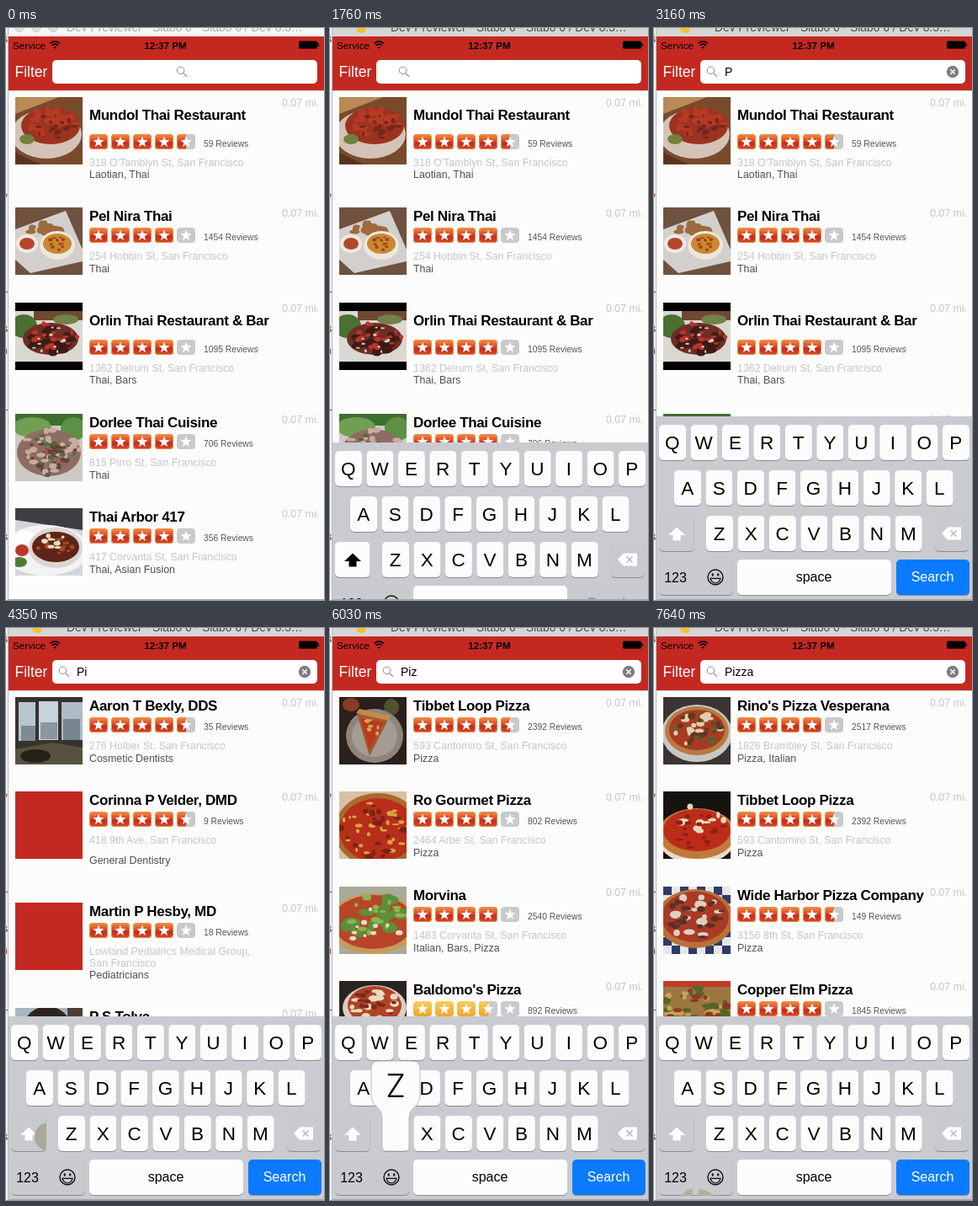
These frames come from a looping animation (378 by 679 pixels, 8 s). An HTML page:

```html
<!DOCTYPE html>
<html lang="en">
<head>
<meta charset="utf-8">
<title>Restaurant search</title>
<style>
html, body { margin: 0; width: 100%; height: 100%; overflow: hidden; background: #fcfcfc; }
svg { display: block; width: 378px; height: 679px; font-family: "Liberation Sans", Arial, sans-serif; }
.t { animation: 8s step-end infinite; }
.name { font-weight: bold; font-size: 17px; letter-spacing: -.35px; }
.count { font-size: 10.3px; fill: #555; }
.soft { font-size: 12.4px; fill: #c6c6c8; }
.cat { font-size: 12.4px; fill: #505050; }
.key { font-size: 22.5px; text-anchor: middle; }
.label { font-size: 16px; text-anchor: middle; }
.big { font: 300 38px Inter, Roboto, sans-serif; text-anchor: middle; }
</style>
</head>
<body>
<svg id="stage" viewBox="0 0 378 679"></svg>
<script>
const LOOP = 8000, RED = '#c42921';
const rules = [];

// Stepped keyframes from [ms, value] stops
function track(prop, stops) {
  const name = 'k' + rules.length;
  rules.push(`@keyframes ${name}{${stops.map(([ms, v]) => `${ms / LOOP * 100}%{${prop}:${v}}`).join('')}}`);
  return `class="t" style="animation-name:${name}"`;
}
function show(from, to, body) {
  const stops = [[0, from ? 0 : 1]];
  if (from) stops.push([from, 1]);
  if (to < LOOP) stops.push([to, 0]);
  return `<g ${track('opacity', stops)}>${body}</g>`;
}

const rect = (x, y, w, h, fill, r = 0) => `<rect x="${x}" y="${y}" width="${w}" height="${h}" rx="${r}" fill="${fill}"/>`;
const oval = (x, y, rx, ry, fill) => `<ellipse cx="${x}" cy="${y}" rx="${rx}" ry="${ry}" fill="${fill}"/>`;
const poly = (points, fill) => `<polygon points="${points}" fill="${fill}"/>`;
const line = (d, color, w = 1) => `<path d="${d}" fill="none" stroke="${color}" stroke-width="${w}"/>`;
const text = (x, y, s, cls = '', fill = '') =>
  `<text x="${x}" y="${y}" class="${cls}"${fill && ` style="fill:${fill}"`}>${s.replace(/&/g, '&amp;')}</text>`;

// Seeded blobs of food inside an ellipse
function bits(seed, n, color, x, y, rx, ry, size = 3) {
  const rnd = () => (seed = (seed * 16807) % 2147483647) / 2147483647;
  let out = '';
  for (let i = 0; i < n; i++) {
    const a = rnd() * 6.283, d = Math.sqrt(rnd());
    out += oval((x + Math.cos(a) * d * rx).toFixed(1), (y + Math.sin(a) * d * ry).toFixed(1),
      (size * (.5 + rnd())).toFixed(1), (size * (.4 + rnd() * .6)).toFixed(1), color);
  }
  return out;
}

const photos = {
  wings: rect(0, 0, 80, 80, '#7a4a2d') + poly('0,0 52,0 0,20', '#b98a55') + poly('0,66 30,80 0,80', '#5a3320') + oval(37, 44, 42, 29, '#d3c3b6') +
    oval(42, 34, 35, 22, '#9c3320') + bits(7, 24, '#b83a24', 42, 32, 31, 18, 5) + bits(19, 16, '#74261a', 42, 36, 30, 17, 3) + oval(14, 50, 9, 6, '#71803c'),
  platter: rect(0, 0, 80, 80, '#6f5140') + poly('0,26 60,4 80,50 80,64 18,78 0,62', '#d3cfcc') + bits(3, 18, '#9c6a3d', 36, 27, 22, 9, 5) +
    oval(14, 43, 13, 11, '#eee9e3') + oval(14, 43, 9, 7, '#b4472a') + oval(50, 45, 21, 17, '#ece6dd') + oval(50, 43, 17, 12, '#c9892f') + bits(9, 12, '#a8401f', 50, 43, 13, 8, 2),
  beef: rect(0, 0, 80, 80, '#000') + rect(0, 10, 80, 60, '#dad8d2') + oval(10, 28, 16, 14, '#4c6f32') + rect(22, 10, 58, 11, '#6f4a31') + oval(60, 20, 15, 6, '#718148') +
    oval(42, 43, 33, 19, '#6f2d24') + bits(5, 24, '#3d1c18', 42, 43, 31, 17, 5) + bits(15, 16, '#bd3427', 44, 41, 30, 18, 3) + bits(25, 12, '#d8cabc', 40, 46, 30, 18, 2),
  larb: rect(0, 0, 80, 80, '#cdc9c5') + rect(0, 0, 80, 14, '#3f6f30') + oval(20, 16, 23, 12, '#6f9f52') + oval(69, 18, 15, 14, '#5d8f45') + oval(40, 46, 38, 28, '#8d6c62') +
    bits(8, 28, '#5f433d', 42, 46, 34, 25, 4) + bits(18, 26, '#c9aaa0', 42, 44, 34, 26, 4) + bits(28, 12, '#47702f', 42, 47, 34, 26, 3) + bits(31, 6, '#b53a32', 34, 50, 24, 18, 2),
  curry: rect(0, 0, 80, 80, '#d4d5dc') + poly('0,0 80,0 80,26 0,14', '#3f3d42') + oval(36, 50, 52, 30, '#f3f3f5') + oval(12, 38, 13, 11, '#fff') +
    oval(8, 50, 8, 7, '#b8382a') + oval(5, 64, 9, 6, '#4f7c33') + oval(48, 47, 32, 24, '#dcd5d2') + oval(48, 46, 28, 18, '#5f2418') + bits(6, 12, '#a8481f', 48, 46, 22, 13, 3) + bits(16, 10, '#ead9bd', 46, 40, 16, 8, 3),
  office: rect(0, 0, 80, 80, '#37322c') + rect(4, 6, 20, 46, '#b9c6d0') + rect(28, 5, 23, 46, '#c7d2da') + rect(55, 6, 25, 45, '#aebcc8') +
    rect(7, 34, 17, 18, '#7f8b93') + rect(30, 30, 20, 20, '#8a979f') + rect(57, 26, 20, 25, '#76858f') + poly('0,62 44,54 80,60 80,80 0,80', '#57513f') + oval(24, 70, 18, 8, '#252119'),
  plain: rect(0, 0, 80, 80, RED),
  portrait: rect(0, 0, 80, 80, '#a7b6c4') + oval(38, 24, 28, 26, '#2d2422') + rect(62, 0, 18, 80, '#4b4038'),
  slice: rect(0, 0, 80, 80, '#2b201b') + oval(14, 9, 10, 8, '#8b3b24') + oval(62, 12, 9, 10, '#54502f') + oval(42, 46, 34, 32, '#8b857e') + oval(42, 46, 27, 25, '#a39c93') +
    poly('21,20 58,27 36,70', '#a25a2c') + poly('25,25 53,30 36,62', '#b8391f') + poly('20,19 24,14 61,22 58,28', '#c58a4d') + bits(4, 8, '#d9a352', 38, 36, 11, 10, 3),
  deep: rect(0, 0, 80, 80, '#d7c2a2') + oval(46, 46, 52, 44, '#a86a2e') + oval(46, 46, 46, 38, '#b72e1b') + bits(11, 32, '#d7a43e', 44, 44, 42, 34, 3) + bits(21, 22, '#7f2115', 44, 46, 42, 34, 4),
  greens: rect(0, 0, 80, 80, '#a9ab98') + oval(40, 44, 54, 36, '#c79a5c') + oval(40, 42, 48, 32, '#b84429') + bits(12, 28, '#5d8f36', 42, 34, 40, 24, 7) + bits(22, 18, '#8db354', 42, 34, 38, 24, 4) + bits(32, 10, '#e4dcc4', 40, 46, 38, 20, 3),
  baked: rect(0, 0, 80, 80, '#2a2421') + oval(42, 32, 38, 27, '#d8cfc5') + oval(42, 29, 32, 23, '#b04326') + bits(13, 18, '#ead8c2', 42, 27, 28, 20, 4) + bits(23, 14, '#7a2a1b', 42, 27, 28, 20, 3),
  coppa: rect(0, 0, 80, 80, '#3a3532') + oval(40, 43, 42, 34, '#c9c7c3') + oval(40, 40, 38, 29, '#b67b43') + oval(40, 39, 33, 24, '#a83a22') +
    bits(14, 16, '#e0cfae', 40, 38, 30, 21, 4) + bits(24, 14, '#5b3a22', 40, 38, 30, 21, 4) + bits(34, 10, '#52682f', 40, 38, 30, 21, 3),
  round: rect(0, 0, 80, 80, '#15120f') + oval(40, 56, 46, 30, '#e5dccd') + oval(40, 50, 46, 30, '#c07a3b') + oval(40, 46, 40, 25, '#bd2c19') + bits(15, 10, '#e9d5b8', 42, 34, 30, 18, 4) + bits(25, 18, '#8f1f12', 40, 48, 36, 21, 3),
  checks: rect(0, 0, 80, 80, '#e6e6ea') + Array.from({ length: 32 }, (_, i) =>
    rect(i % 4 * 20 + (i >> 2) % 2 * 10, (i >> 2) * 10, 10, 10, '#303b66')).join('') + oval(38, 38, 46, 35, '#b9713a') +
    oval(38, 36, 40, 30, '#a93a24') + bits(16, 18, '#dcd0c2', 38, 36, 34, 25, 5) + bits(26, 20, '#5a3026', 38, 38, 36, 26, 4),
  square: rect(0, 0, 80, 80, '#9c7640') + rect(0, 0, 80, 7, '#c23a2e') + bits(17, 26, '#55652c', 40, 30, 40, 24, 5) + bits(27, 20, '#c9a15a', 40, 30, 40, 24, 4) + bits(37, 12, '#8c3a22', 40, 30, 38, 22, 4)
};

const starPath = Array.from({ length: 10 }, (_, i) => {
  const r = i % 2 ? 2.9 : 6.8, a = i * Math.PI / 5;
  return `${(11 + r * Math.sin(a)).toFixed(2)},${(9.4 - r * Math.cos(a)).toFixed(2)}`;
}).join(' ');

const defs = `<defs>
  <linearGradient id="hot" x2="0" y2="1"><stop offset="0" stop-color="#f39043"/><stop offset=".35" stop-color="#e2582c"/><stop offset=".6" stop-color="#c62c1d"/><stop offset="1" stop-color="#d8492a"/></linearGradient>
  <linearGradient id="warm" x2="0" y2="1"><stop offset="0" stop-color="#f8cf5c"/><stop offset="1" stop-color="#f0a42c"/></linearGradient>
  <clipPath id="half"><path d="M0 0H11V18H0Z"/></clipPath>
  <clipPath id="pic"><path d="M0 0H80V80H0Z"/></clipPath>
  <clipPath id="phone"><path d="M3 10H378V678H3Z"/></clipPath></defs>`;

const badge = fill => rect(0, 0, 22, 18, fill, 4) +
  (fill === 'url(#hot)' ? '<rect x=".5" y=".5" width="21" height="17" rx="3.5" fill="none" stroke="#ee8a45"/>' : '');

function rating(y, score) {
  const fill = score < 4 ? 'url(#warm)' : 'url(#hot)';
  return [0, 1, 2, 3, 4].map(i => {
    const part = score - i;
    const back = part >= 1 ? badge(fill)
      : badge('#c9cacc') + (part > 0 ? `<g clip-path="url(#half)">${badge(fill)}</g>` : '');
    return `<g transform="translate(${99 + 26 * i} ${y})">${back}${poly(starPath, '#fff')}</g>`;
  }).join('');
}

// drop: extra space over the title; gap: extra space over the category
function row([y, photo, name, score, count, street, cat, drop = 0, gap = 0]) {
  const top = y + (drop ? 11 : 0), mid = y + (drop ? 20 : 0);
  return `<g transform="translate(11 ${y})" clip-path="url(#pic)">${photos[photo]}</g>` +
    text(99, top + 16, name, 'name') + rating(mid + 24, score) + text(235, mid + 38.5, count + ' Reviews', 'count') +
    street.split('|').map((s, i) => text(99, mid + 61.5 + 14 * i, s, 'soft')).join('') +
    text(99, mid + 77 + gap - (drop ? 1 : 0), cat, 'cat') + text(328, y + 11, '0.07 mi.', 'soft');
}
const list = (from, to, rows) => show(from, to, rect(3, 74, 375, 604, '#fcfcfc') + rows.map(row).join(''));
const CITY = ', San Francisco';

const lists =
  list(0, 3720, [
    [82, 'wings', 'Mundol Thai Restaurant', 4.5, 59, "318 O'Tamblyn St" + CITY, 'Laotian, Thai', 1],
    [213, 'platter', 'Pel Nira Thai', 4, 1454, '254 Hobbin St' + CITY, 'Thai'],
    [326, 'beef', 'Orlin Thai Restaurant & Bar', 4, 1095, '1362 Delrum St' + CITY, 'Thai, Bars', 1],
    [458, 'larb', 'Dorlee Thai Cuisine', 4, 706, '815 Pirro St' + CITY, 'Thai'],
    [570, 'curry', 'Thai Arbor 417', 4, 356, '417 Corvanta St' + CITY, 'Thai, Asian Fusion']]) +
  list(3720, 5400, [
    [82, 'office', 'Aaron T Bexly, DDS', 4.5, 35, '276 Holber St' + CITY, 'Cosmetic Dentists'],
    [194, 'plain', 'Corinna P Velder, DMD', 4.5, 9, '418 9th Ave' + CITY, 'General Dentistry', 0, 9],
    [326, 'plain', 'Martin P Hesby, MD', 4, 18, 'Lowland Pediatrics Medical Group,|San Francisco', 'Pediatricians', 0, 13],
    [451, 'portrait', 'P S Tolva', 4, 12, '590 Marrin St' + CITY, 'Doctors']]) +
  list(5400, 7640, [
    [82, 'slice', 'Tibbet Loop Pizza', 4.5, 2392, '593 Cantomiro St' + CITY, 'Pizza'],
    [194, 'deep', 'Ro Gourmet Pizza', 4, 802, '2464 Arbe St' + CITY, 'Pizza'],
    [307, 'greens', 'Morvina', 4, 2540, '1483 Corvanta St' + CITY, 'Italian, Bars, Pizza'],
    [419, 'baked', "Baldomo's Pizza", 3.5, 892, '350 Tellis St' + CITY, 'Pizza']]) +
  list(7640, LOOP, [
    [82, 'coppa', "Rino's Pizza Vesperana", 4, 2517, '1826 Brambley St' + CITY, 'Pizza, Italian'],
    [194, 'round', 'Tibbet Loop Pizza', 4.5, 2392, '593 Cantomiro St' + CITY, 'Pizza'],
    [307, 'checks', 'Wide Harbor Pizza Company', 4.5, 149, '3156 8th St' + CITY, 'Pizza'],
    [419, 'square', 'Copper Elm Pizza', 4, 1845, '702 Osker St' + CITY, 'Pizza']]);

// Window title and the sliver of desktop on the left
const title = fill => `<text x="72" y="4" font-size="13.8" fill="${fill}">Dev Previewer - Slabo 6 - Slabo 6 / Dev 8.3…</text>`;
const frame = rect(0, 0, 3, 679, '#f3f3f6') + rect(2, 0, 1, 679, '#b9b9be') +
  [[17, 's', '#333'], [205, '?', '#d22'], [322, 'T', '#334'], [361, 's', '#222'], [387, 'n', '#c33'], [451, '_', '#222'], [608, 's', '#222']]
    .map(([y, s, c]) => `<text x="2" y="${y}" font-size="12" text-anchor="end" fill="${c}">${s}</text>`).join('') +
  rect(3, 678, 375, 1, '#a6a6a9') +
  show(0, 500, rect(3, 0, 375, 10, '#f6f6f6') + [16, 36, 56].map(x =>
    `<circle cx="${x}" cy="-1" r="5.5" fill="#dedede" stroke="#c6c6c6"/>`).join('') + title('#a9a9a9')) +
  show(500, LOOP, rect(3, 0, 375, 10, '#d6d6d7') + oval(37, 0, 6, 6, '#f6be32') + title('#4a4a4a'));

const bar = rect(3, 10, 375, 64, RED) + rect(3, 74, 375, 1, '#d4d2d2') +
  '<text x="8" y="24.5" font-size="11.7">Service</text>' +
  line('M52.5 18.2Q58.2 13.6 64 18.2M54.6 20.6Q58.2 17.6 61.9 20.6', '#000', 1.7) + poly('56.2,22.4 60.2,22.4 58.2,24.8', '#000') +
  '<text x="189.5" y="24.5" font-size="11.7" font-weight="bold" text-anchor="middle">12:37 PM</text>' +
  rect(348, 15.5, 22, 9, '#000', 1.5) + rect(370.5, 18, 1.5, 4, '#000') +
  '<text x="10.5" y="58" font-size="17.5" fill="#fff">Filter</text>' + rect(55, 38, 315, 28, '#fff', 5);

// Motion is sampled at these moments
const beats = [1550, 1620, 1690, 1760, 1830, 1970, 2040, 2180];
const spring = ms => { const x = .0106 * (ms - 1437); return (1 + x) * Math.exp(-x); };
const ease = ms => { const p = Math.min(1, (ms - 1459) / 390); return p * p * (3 - 2 * p); };
const slide = (axis, first, at) => track('transform', [[0, first], ...beats.map(ms => [ms, at(ms)])].map(([ms, v]) => [ms, `translate${axis}(${v}px)`]));

const lens = `<g ${slide('X', 140, ms => Math.round(140 * (1 - ease(ms))))}><circle cx="67.5" cy="50.3" r="4.3" fill="none" stroke="#8b8b90"/>${line('M70.6 53.4L75 57.8', '#8b8b90', 1.2)}</g>`;

const typed = [[3090, 'P'], [4280, 'Pi'], [5680, 'Piz'], [6170, 'Pizz'], [6870, 'Pizza'], [LOOP]];
const field = lens + typed.slice(0, -1).map(([ms, s], i) =>
  show(ms, typed[i + 1][0], `<text x="84" y="57" font-size="14">${s}</text>`)).join('') +
  show(3090, LOOP, oval(355, 52, 7.2, 7.2, '#7d7e83') + line('M352.3 49.3L357.7 54.7M357.7 49.3L352.3 54.7', '#fff', 1.5));

const cap = (x, y, w, fill = '#fcfcfd') => rect(x, y + 1, w, 42, '#8c8e93', 5) + rect(x, y, w, 42, fill, 5);
const GREY = '#c8cacf';
const keys = {};
[['QWERTYUIOP', 6, 471], ['ASDFGHJKL', 24, 525], ['ZXCVBNM', 62, 579]].forEach(([chars, x, y]) =>
  [...chars].forEach((c, i) => keys[c] = [x + 37.45 * i + 16, y]));

const arrow = fill => poly('27,592.5 37,602 31.5,602 31.5,608.500 22.5,608.500 22.5,602 17,602', fill);
const smile = '<circle cx="73" cy="652" r="9" fill="none" stroke="#111" stroke-width="1.4"/>' + oval(69.8, 649, 1.2, 1.8, '#111') + oval(76.2, 649, 1.2, 1.8, '#111') +
  line('M67 653.3H79Q77.5 658.8 73 658.8T67 653.3Z', '#111', 1.2);

const board = rect(3, 461, 375, 218, '#cacbd0') +
  Object.entries(keys).map(([c, [x, y]]) => cap(x - 16, y, 32) + text(x - .3, y + 29, c, 'key')).join('') +
  cap(6, 579, 41.5, GREY) + arrow('#fff') + show(1550, 3090, cap(6, 579, 41.5) + arrow('#000')) +
  cap(334, 579, 40, GREY) + poly('342,600 349,592.5 365,592.5 365,607.5 349,607.5', '#fff') + line('M352.5 596.5L359.5 603.5M359.5 596.5L352.5 603.5', '#b2b4ba', 1.4) +
  cap(6, 631, 88, GREY) + text(25.5, 657.5, '123', 'label') + smile +
  cap(99, 631, 183) + text(190, 657, 'space', 'label') +
  cap(288, 631, 87, GREY) + text(331, 657, 'Search', 'label', '#85878c') +
  show(3090, LOOP, cap(288, 631, 87, '#0a7aff') + text(331, 657, 'Search', 'label', '#fff')) +
  show(3720, 5400, '<path d="M48 588A14 16 0 0 0 48 620Z" fill="#aaa899"/>') +
  show(7640, LOOP, '<path d="M33 674Q36 667 46 665V674ZM53 666Q66 667 70 674H53Z" fill="#b3b09d"/>');

const keyboard = show(1550, LOOP, `<g ${slide('Y', 216, ms => Math.floor(216 * spring(ms)))}>${board}</g>`);

function popup(c, from, to) {
  const [x, y] = keys[c], r = Math.min(x + 29, 376), l = r - 58;
  return show(from, to, `<path d="M${l + 9} ${y - 65}H${r - 9}Q${r} ${y - 65} ${r} ${y - 56}V${y - 24}C${r} ${y - 10} ${x + 16} ${y - 12} ${x + 16} ${y + 4}V${y + 37}q0 5 -5 5H${x - 11}q-5 0 -5 -5V${y + 4}C${x - 16} ${y - 12} ${l} ${y - 10} ${l} ${y - 24}V${y - 56}Q${l} ${y - 65} ${l + 9} ${y - 65}Z" fill="#fcfcfd" stroke="#a9abb0" stroke-width=".8"/>` +
    text((l + r) / 2, y - 22, c, 'big'));
}
const popups = popup('P', 3090, 3160) + popup('I', 4140, 4350) + popup('Z', 5540, 5750) + popup('Z', 6030, 6240) + popup('A', 6730, 6940);

document.getElementById('stage').innerHTML = `<style>${rules.join('')}</style>` + defs + frame +
  `<g clip-path="url(#phone)">${lists}${bar}${field}${keyboard}${popups}</g>`;
</script>
</body>
</html>
```
